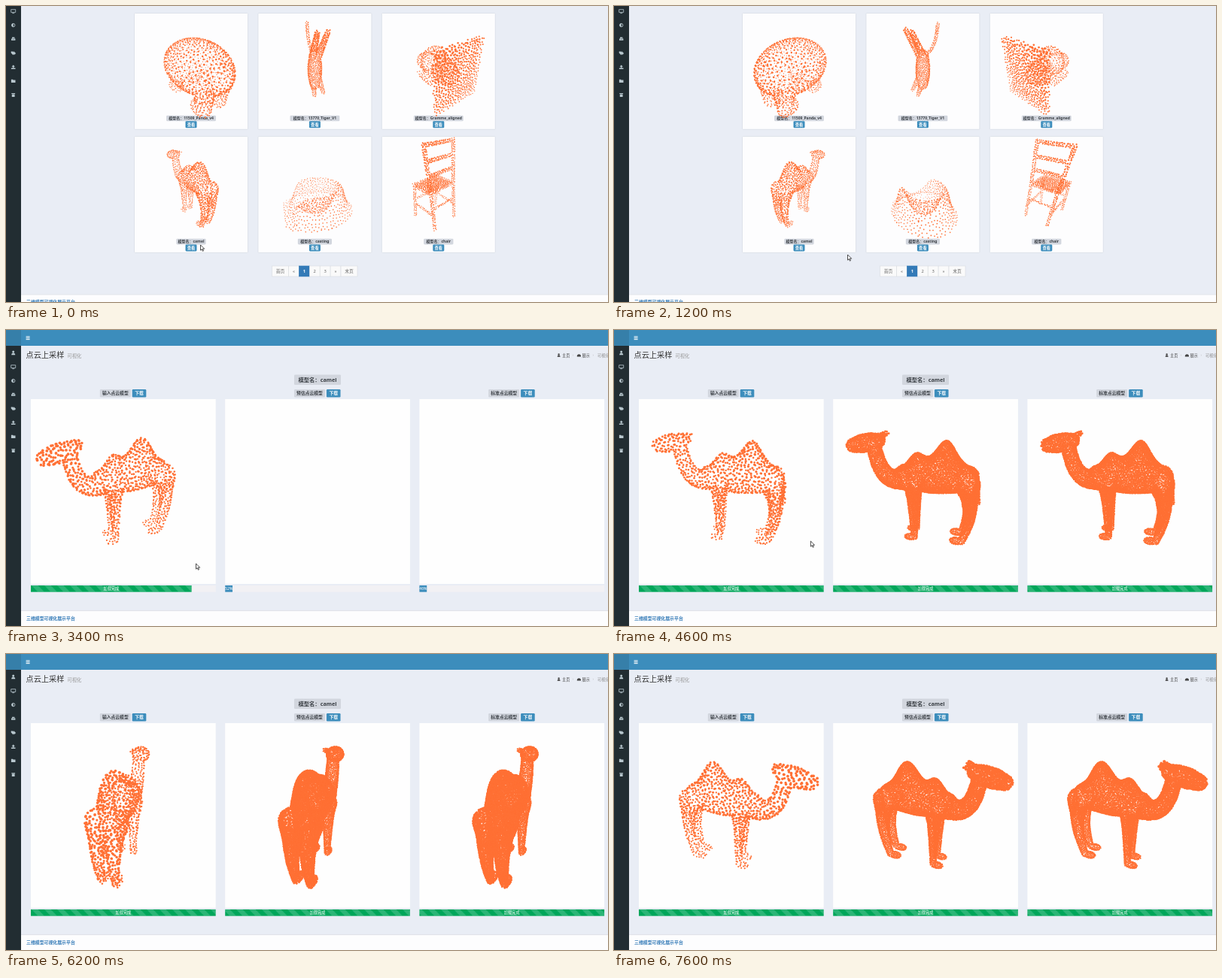
Animation of 800 by 394 pixels, one loop 7800 ms. Source, as an HTML page with a canvas:

```html
<!DOCTYPE html>
<html lang="zh">
<head>
<meta charset="utf-8">
<title>点云上采样</title>
<style>
  html, body { margin: 0; width: 100%; height: 100%; overflow: hidden; background: #e9edf5; }
  svg, canvas { position: absolute; left: 0; top: 0; width: 800px; height: 394px; }
  text { font-family: "Noto Sans", "Noto Sans CJK SC", "Noto Sans CJK", sans-serif; }
</style>
</head>
<body>
<svg id="pages" viewBox="0 0 800 394"></svg>
<canvas id="clouds" width="800" height="394"></canvas>
<svg viewBox="0 0 800 394"><path id="cursor" d="M0 0V7.2L1.7 5.7 2.9 8.3 4 7.8 2.9 5.2H5.2Z" fill="#fff" stroke="#222" stroke-width=".8"/></svg>
<script>
const LOOP = 7800, STEP = 200, HOVER = 2000, OPEN = 2400, READY = 2600, FIRST = 3000, REST = 4000;
const BLUE = '#3c8dbc', GREY = '#d2d6de', ORANGE = '#ff7034';
const byId = id => document.getElementById(id);

// ---------- page markup ----------
const rect = (x, y, w, h, fill, extra = '') =>
  `<rect x="${x}" y="${y}" width="${w}" height="${h}" fill="${fill}" ${extra}/>`;
const text = (x, y, size, fill, content, extra = '') =>
  `<text x="${x}" y="${y}" font-size="${size}" fill="${fill}" ${extra}>${content}</text>`;
const badge = (cx, cy, w, h, size, content, fill = GREY, ink = '#3a3f45', extra = '') =>
  rect(cx - w / 2, cy - h / 2, w, h, fill, `rx="1.3" ${extra}`) +
  text(cx, cy + size * .36, size, ink, content, 'text-anchor="middle" font-weight="600"');

const ICONS = {
  user: '<circle cy="-1.5" r="1.5"/><path d="M-2.5 2.8Q-2.5 0 0 0T2.5 2.8Z"/>',
  screen: '<path d="M-3-2.3H3V1.4H-3ZM-1.5 2.6H1.5" fill="none" stroke="#b8c7ce" stroke-width=".8"/>',
  contrast: '<circle r="2.2" fill="none" stroke="#b8c7ce" stroke-width=".9"/><path d="M0-2.2A2.2 2.2 0 0 0 0 2.2Z"/>',
  printer: '<path d="M-1.7-2.5H1.7V-.6H2.7V1.7H-2.7V-.6H-1.7Z"/><path d="M-1.2-.3H1.2" stroke="#222d32" stroke-width=".6"/>',
  tags: '<path d="M-3-2.2H-.6L2 .4-.3 2.5-3-.1ZM.4-2.2H1L3.4.4 1.2 2.5Z"/>',
  upload: '<path d="M0-2.7L2.2-.4H.8V1H-.8V-.4H-2.2ZM-2.8 1.2H2.8V2.7H-2.8Z"/>',
  folder: '<path d="M-2.8-2.1H-.6L0-1.3H2.8V2.2H-2.8Z"/>',
  trash: '<path d="M-2.4-2.2H2.4V-1.2H-2.4ZM-1.9-.8H1.9V2.7H-1.9Z"/>'
};
const iconNames = Object.keys(ICONS);
const sidebar = (names, top) => names.map((name, i) =>
  `<g transform="translate(9.7 ${top + i * 18.55})" fill="#b8c7ce">${ICONS[name]}</g>`).join('');
const footer = (y, base) => rect(20, y, 780, 394 - y, '#fdfdfe') + rect(20, y, 780, .7, GREY) +
  text(27, base, 5.9, '#337ab7', '三维模型可视化展示平台', 'font-weight="600"');

const CARDS = ['11509_Panda_v4', '13770_Tiger_V1', 'Gramme_aligned', 'camel', 'casting', 'chair'];
const cardX = i => 246 + (i % 3) * 164.4;
const cardY = i => 9.5 + Math.floor(i / 3) * 164.1;

function listPage() {
  const cards = CARDS.map((name, i) => {
    const x = cardX(i), y = cardY(i);
    return rect(x - 75.5, y, 151, 154.8, '#fdfdfe', 'stroke="#d9dee6" stroke-width=".8" rx="1"') +
      badge(x, y + 140, 24.5 + name.length * 2.95, 7.6, 5, '模型名：' + name) +
      badge(x, y + 148.3, 15, 9, 5.3, '查看', BLUE, '#fff', `id="view-${name}"`);
  }).join('');
  let edge = 353.5;
  const pager = ['首页', '«', '1', '2', '3', '»', '末页'].map(label => {
    const x = edge, w = label.length > 1 ? 22 : 13.9, on = label === '1';
    edge += w;
    return rect(x, 346, w, 14, on ? '#337ab7' : '#fafafa', `stroke="${on ? '#337ab7' : '#d8dbe0'}" stroke-width=".6"`) +
      text(x + w / 2, 355, 5.8, on ? '#fff' : '#666', label, `text-anchor="middle" ${on ? 'font-weight="700"' : ''}`);
  }).join('');
  return rect(0, 0, 20, 394, '#222d32') + sidebar(iconNames.slice(1), 7) + cards + pager + footer(383.7, 396);
}

const PANEL = 245.7;
const panelX = i => 33 + i * 258.2;
const PANELS = [['输入点云模型', 100], ['预估点云模型', 52], ['标准点云模型', 46]];

function detailPage() {
  const panels = PANELS.map(([label], i) => {
    const x = panelX(i);
    return badge(x + 112.3, 84.2, 41, 10.6, 5.8, label) + badge(x + 144, 84.2, 18.6, 10.6, 5.8, '下载', BLUE, '#fff') +
      rect(x, 92, PANEL, 246, '#fefefe') + rect(x, 340, PANEL, 8.7, '#f2f1f4') +
      rect(x, 340, 0, 8.7, BLUE, `id="bar${i}"`) + rect(x, 340, 0, 8.7, 'url(#stripes)', `id="stripe${i}"`) +
      text(x, 346.2, 5.2, '#fff', '', `id="done${i}" text-anchor="middle"`);
  }).join('');
  const crumbs = `<g fill="#444" transform="translate(734.6 33.6) scale(.8)">${ICONS.user}</g>` +
    '<path d="M758.9 35.6A2.6 2.6 0 1 1 763.9 35.6Z" fill="#444"/>' +
    text(739, 35.5, 5.2, '#444', '主页') + text(752.7, 35.3, 5, '#bbb', '›') +
    text(765.5, 35.5, 5.2, '#444', '展示') + text(779.5, 35.3, 5, '#bbb', '›') + text(786, 35.5, 5.2, '#888', '可视化');
  return rect(0, 0, 800, 394, '#e9edf5') + rect(0, 0, 20, 394, '#222d32') + rect(0, 0, 800, 21, BLUE) + rect(0, 0, 20, 21, '#367fa9') +
    `<g id="content">${sidebar(iconNames, 30.5)}<path d="M26.6 8.8h5m-5 1.9h5m-5 1.9h5" stroke="#fff"/>` +
    text(26.5, 36.8, 10.2, '#333', '点云上采样') + text(81.5, 36.8, 6.3, '#999', '可视化') + crumbs +
    badge(414, 66.3, 62, 13.6, 7.3, '模型名：camel') + panels + footer(373.4, 386) + '</g>';
}

byId('pages').innerHTML = `<defs><pattern id="stripes" width="17" height="8.7" y="340" patternUnits="userSpaceOnUse">
  <path d="M0 0H8.5L17 8.7H8.5Z" fill="#fff" opacity=".17"/></pattern></defs>
  <g id="list">${listPage()}</g><g id="detail">${detailPage()}</g>`;

// ---------- solids: points are [forward, up, side] ----------
let seed = 7;
const rnd = () => {
  seed = seed + 0x6D2B79F5 | 0;
  let v = Math.imul(seed ^ seed >>> 15, 1 | seed);
  v = v + Math.imul(v ^ v >>> 7, 61 | v) ^ v;
  return ((v ^ v >>> 14) >>> 0) / 4294967296;
};
const { PI, sin, cos, sqrt, max, min } = Math;
const mix = (a, b, t) => a + (b - a) * t;
const bump = (x, centre, width) => Math.exp(-(((x - centre) / width) ** 2));
const arch = (x, centre, width) => sqrt(max(0, 1 - ((x - centre) / width) ** 2));
const direction = () => {
  const h = rnd() * 2 - 1, a = rnd() * 2 * PI, w = sqrt(1 - h * h);
  return [w * cos(a), h, w * sin(a)];
};

function tube(a, b) {
  const axis = [0, 1, 2].map(i => b[i] - a[i]);
  const len2 = axis.reduce((s, v) => s + v * v, 0), r = (a[3] + b[3]) / 2;
  return {
    area: 2 * PI * r * (sqrt(len2) + 2 * r),
    pick() {
      const t = rnd(), size = mix(a[3], b[3], t);
      return direction().map((v, i) => a[i] + axis[i] * t + v * size);
    },
    holds(p) {
      let t = 0, d = 0;
      for (let i = 0; i < 3; i++) t += (p[i] - a[i]) * axis[i] / len2;
      t = max(0, min(1, t));
      for (let i = 0; i < 3; i++) d += (p[i] - a[i] - axis[i] * t) ** 2;
      return d < (.95 * mix(a[3], b[3], t)) ** 2;
    }
  };
}
// Tube along a curve; at(u) gives [forward, up, side, radius].
const sweep = (at, steps = 5) => Array.from({ length: steps }, (_, i) => tube(at(i / steps), at((i + 1) / steps)));
const both = make => [-1, 1].flatMap(make);
const blob = (f, y, l, rf, ry, rl) => ({
  area: 4 * PI * (rf * ry + ry * rl + rf * rl) / 3,
  pick() { const d = direction(); return [f + d[0] * rf, y + d[1] * ry, l + d[2] * rl]; },
  holds: p => ((p[0] - f) / rf) ** 2 + ((p[1] - y) / ry) ** 2 + ((p[2] - l) / rl) ** 2 < .92
});
const patch = (area, at) => ({ area, pick: () => at(rnd(), rnd()), holds: () => false });
// Trunk with elliptic sections between two height profiles.
const trunk = (centre, reach, top, bottom, half) => {
  const section = f => [(top(f) + bottom(f)) / 2, (top(f) - bottom(f)) / 2, half(f)];
  return {
    area: 4 * PI * reach * half(centre) * 1.5,
    pick() {
      const f = centre + reach * cos(rnd() * PI), a = rnd() * 2 * PI, [y, h, w] = section(f);
      return [f, y + h * sin(a), w * cos(a)];
    },
    holds(p) {
      const [y, h, w] = section(p[0]);
      return ((p[1] - y) / h) ** 2 + (p[2] / w) ** 2 < .9;
    }
  };
};
const legs = (f, side, top, foot, r, thin = .36, bend = 0) => both(s => [
  ...sweep(u => [f + bend * sin(PI * u), mix(top, foot, u), s * side, r * mix(1, thin, sqrt(u))]),
  blob(f + r * .5, foot, s * side, r * thin + 5, r * thin, r * thin + 1)
]);

// Evenly spaced surface points: no two closer than the gap.
function scatter(parts, gap) {
  const cells = new Map(), points = [];
  const key = (x, y, z) => (x + 512) * 1048576 + (y + 512) * 1024 + z + 512;
  const crowded = (p, c) => {
    for (let x = -1; x < 2; x++) for (let y = -1; y < 2; y++) for (let z = -1; z < 2; z++) {
      const q = cells.get(key(c[0] + x, c[1] + y, c[2] + z));
      if (q && (p[0] - q[0]) ** 2 + (p[1] - q[1]) ** 2 + (p[2] - q[2]) ** 2 < gap * gap) return true;
    }
    return false;
  };
  for (const part of parts) {
    for (let n = 14 * part.area / gap ** 2; n > 0; n--) {
      const p = part.pick();
      if (parts.some(other => other.holds(p))) continue;
      const c = p.map(v => Math.floor(v / gap));
      if (crowded(p, c)) continue;
      cells.set(key(...c), p);
      points.push(p);
    }
  }
  return points;
}

const barrel = f => arch(f, -15, 51);
const camel = [
  trunk(-15, 51, f => 22 + 24 * barrel(f) + 24 * bump(f, -25, 14) + 10 * bump(f, 12, 10),
    f => 22 - 21 * barrel(f), f => 20 * barrel(f)),
  ...sweep(u => [24 + 40 * sin(PI * u / 2), 20 - 10 * sin(PI * u) + 46 * u * u, 0, mix(17, 8, sqrt(u))], 8),
  ...sweep(u => [mix(58, 91, u), mix(67, 59, u), 0, 8 + 3 * sin(PI * u)], 3),
  ...both(s => sweep(u => [mix(58, 49, u), mix(71, 74, u), s * mix(4, 8, u), 2.5], 1)),
  ...sweep(u => [-64 - 6 * u, 24 - 36 * u, 0, 2.2]),
  ...legs(15, 10, 14, -72, 11), ...legs(-53, 10, 20, -72, 15, .3, -7)
];

const bulk = f => arch(f, -20, 84);
const panda = [
  trunk(-20, 84, f => 6 + 56 * bulk(f), f => 6 - 48 * bulk(f), f => 62 * bulk(f)),
  ...legs(-70, 22, -15, -64, 23, .7), ...legs(20, 27, -15, -62, 19, .7)
];

const tiger = [
  ...sweep(u => [0, mix(26, -58, u), 0, 12 + 5 * sin(PI * u)]),
  ...both(s => sweep(u => [4 + 30 * u, 24 + 62 * u, s * (7 + 4 * u), 8 - 4 * u])),
  ...both(s => sweep(u => [6 + 18 * u, -38 - 32 * u, s * (8 + 4 * u), 7 - 3 * u])),
  ...sweep(u => [-4 - 37 * sin(PI * u / 2), 24 + 64 * u * u, 0, 3.3], 7)
];

const slab = f => patch(15000, (u, v) => [f, mix(-62, 70, u), mix(-55, 55, v)]);
const gramme = [
  slab(-66), slab(-57), blob(-20, -6, 0, 38, 25, 24), blob(18, 4, 0, 20, 34, 32), blob(46, -10, 0, 28, 22, 24),
  ...both(s => sweep(u => [mix(-5, 40, u), -32, s * 24, 9], 1))
];

const casting = [patch(38000, (u, v) => {
  const r = sqrt(u), a = 2 * PI * v, f = max(-72, 92 * r * cos(a));
  return [f, -58 + 62 * bump(r, .62, .2) * (.5 + .5 * Math.tanh((f + 45) / 14)), 74 * r * sin(a)];
})];

const lean = ([f, y, l]) => [f, y, l - .13 * y];
const stick = (a, b, r = 3) => tube([...lean(a), r], [...lean(b), r]);
const backAt = y => -14 + .24 * y;
const chair = [
  ...both(s => [
    stick([backAt(98), 98, s * 41], [backAt(0), 0, s * 34], 3.5), stick([backAt(0), 0, s * 34], [backAt(-76), -76, s * 32]),
    stick([42, 3, s * 36], [38, -76, s * 34]), stick([-24, -44, s * 33], [40, -40, s * 35], 2)
  ]),
  ...[97, 68, 40].map(y => stick([backAt(y), y, -39], [backAt(y), y, 39], 3.5)),
  ...[-20, 40].map(f => stick([f, -30, -34], [f, -30, 34], 2)),
  ...[2, 7].map(y => patch(5000, (u, v) => lean([mix(-12, 48, u), y, mix(-38, 38, v)])))
];

const sparse = scatter(camel, 4.2);
const dense = scatter(camel, 2);
const mirrored = dense.map(([f, y, l]) => [f, y, -l]);
const gallery = [
  { points: scatter(panda, 6), heading: 127, scale: .6, dot: .72 },
  { points: scatter(tiger, 3.3), heading: 295, scale: .57, dot: .68 },
  { points: scatter(gramme, 5.4), heading: 127, scale: .6, dot: .75 },
  { points: sparse, heading: 127, scale: .57, dot: .68 },
  { points: scatter(casting, 5.6), heading: 15, scale: .6, dot: .65 },
  { points: scatter(chair, 3.7), heading: 134, scale: .59, dot: .72 }
];

// ---------- motion ----------
const SPIN = .064; // degrees per ms
const CURSOR = [[0, 258.5, 318], [1200, 310.5, 331], [2200, 246, 322.5], [3400, 252.5, 311], [5400, 267.3, 261]];
const CURSOR_END = 5800;
// The view stands still while the large clouds load, then turns steadily.
const detailHeading = t => min(200, -20 + SPIN * (7600 - t));
const ramp = (t, from, to) => max(0, min(1, (t - from) / (to - from)));

function cursorAt(t) {
  const i = CURSOR.findIndex(k => k[0] > t);
  const b = CURSOR.at(i), a = i < 0 ? b : CURSOR[i - 1], u = ramp(t, a[0], b[0] + 1e-6);
  return [mix(a[1], b[1], u), mix(a[2], b[2], u)];
}

const ctx = byId('clouds').getContext('2d');
const DISTANCE = 300, PITCH_COS = cos(PI / 6), PITCH_SIN = .5;

function drawCloud(points, degrees, cx, cy, scale, dot) {
  const c = cos(degrees * PI / 180), s = sin(degrees * PI / 180);
  for (const [f, up, l] of points) {
    const x = f * c - l * s, z = f * s + l * c;
    const zoom = DISTANCE / (DISTANCE + z * PITCH_COS - up * PITCH_SIN);
    ctx.beginPath();
    ctx.arc(cx + x * zoom * scale, cy - (up * PITCH_COS + z * PITCH_SIN) * zoom * scale, dot * zoom ** 1.8, 0, 7);
    ctx.fill();
  }
}

function setBar(i, t) {
  const percent = PANELS[i][1], done = t >= (i ? REST : FIRST);
  const loading = t < 3400 ? 0 : mix(.04, percent / 100, ramp(t, 3400, 3800));
  const width = PANEL * (i === 0 ? ramp(t, FIRST, 3460) : done ? 1 : loading);
  byId('bar' + i).setAttribute('width', width);
  byId('bar' + i).setAttribute('fill', done ? '#00a65a' : BLUE);
  byId('stripe' + i).setAttribute('width', done ? width : 0);
  byId('done' + i).setAttribute('x', panelX(i) + width / 2);
  byId('done' + i).textContent = width < 5 ? '' : done ? '加载完成' : percent + '%';
}

const show = (id, on) => byId(id).setAttribute('visibility', on ? 'inherit' : 'hidden');

function render(t) {
  const listing = t < OPEN;
  show('list', listing);
  show('detail', !listing);
  show('content', t >= READY);
  byId('view-camel').setAttribute('fill', t >= HOVER ? '#2f6f97' : BLUE);
  PANELS.forEach((_, i) => setBar(i, t));

  ctx.clearRect(0, 0, 800, 394);
  ctx.fillStyle = ORANGE;
  if (listing) {
    gallery.forEach((m, i) => drawCloud(m.points, m.heading - SPIN * t, cardX(i), cardY(i) + 69, m.scale, m.dot));
  } else {
    [sparse, dense, mirrored].forEach((points, i) => {
      if (t >= (i ? REST : FIRST)) drawCloud(points, detailHeading(t), panelX(i) + PANEL / 2, 215, 1, 1.25);
    });
  }
  show('cursor', t < CURSOR_END);
  byId('cursor').setAttribute('transform', `translate(${cursorAt(t)})`);
}

const start = performance.now();
let shown = -1;
function tick() {
  const t = Math.floor((performance.now() - start) % LOOP / STEP) * STEP;
  if (t !== shown) render(shown = t);
  requestAnimationFrame(tick);
}
tick();
</script>
</body>
</html>
```
